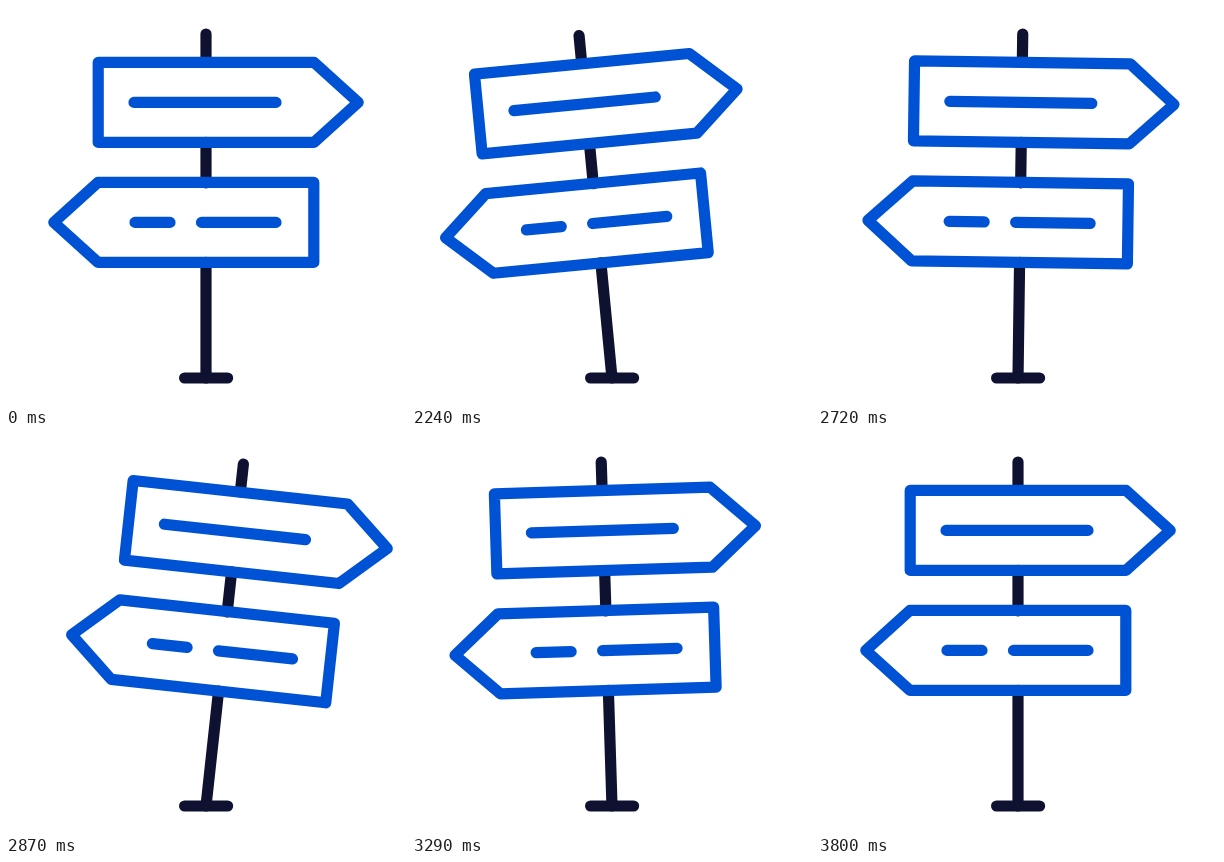
Animation of 400 by 400 pixels, one loop 3830 ms. Source, as an HTML page:

```html
<!DOCTYPE html>
<html lang="en">
<head>
<meta charset="utf-8">
<title>Swaying signpost</title>
<style>
  html, body { margin: 0; height: 100%; overflow: hidden; background: #fff; }
  svg { display: block; width: 100vw; height: 100vh; }
  path { fill: none; stroke-width: 11.2; stroke-linecap: round; stroke-linejoin: round; }
  .pole { stroke: #0f1130; }
  .sign { stroke: #0052d4; }
</style>
</head>
<body>
<svg viewBox="0 0 400 400">
  <g id="post">
    <path class="pole" d="M200 28V56M200 136.4V176.8M200 256.4V372"/>
    <path class="sign" d="M92.2 56.4H308L352.2 96.4L308 136.4H92.2ZM128 96.4H270"/>
    <path class="sign" d="M307.8 176.4H92L47.8 216.4L92 256.4H307.8ZM129 216.4H164M195.5 216.4H270"/>
  </g>
  <path class="pole" d="M178.6 372H221.6"/>
</svg>
<script>
const LOOP = 3830, START = 2000, STEP = 30;
const post = document.getElementById('post');

// Each swing: end step, end angle, and the two horizontal easing handles
const swings = [
  [15, -10, 0.33, 0.67],
  [34, 8, 0.26, 0.5],
  [46, -4, 0.47, 0.67],
  [60, 0, 0.3, 0.55]
];

// Cubic bezier easing with flat ends, solved by bisection
function ease(u, x1, x2) {
  let lo = 0, hi = 1, s = 0.5;
  for (let i = 0; i < 24; i++) {
    s = (lo + hi) / 2;
    const r = 1 - s;
    const x = 3 * x1 * s * r * r + 3 * x2 * s * s * r + s ** 3;
    if (x < u) lo = s; else hi = s;
  }
  return s * s * (3 - 2 * s);
}

function angleAt(step) {
  let from = 0, angle = 0;
  if (step <= 0) return 0;
  for (const [to, target, x1, x2] of swings) {
    if (step < to) {
      return angle + (target - angle) * ease((step - from) / (to - from), x1, x2);
    }
    from = to;
    angle = target;
  }
  return angle;
}

const t0 = performance.now();
function draw() {
  const t = (performance.now() - t0) % LOOP;
  const step = Math.floor((t - START) / STEP);
  post.setAttribute('transform', `rotate(${angleAt(step).toFixed(3)} 200 372)`);
  requestAnimationFrame(draw);
}
draw();
</script>
</body>
</html>
```
